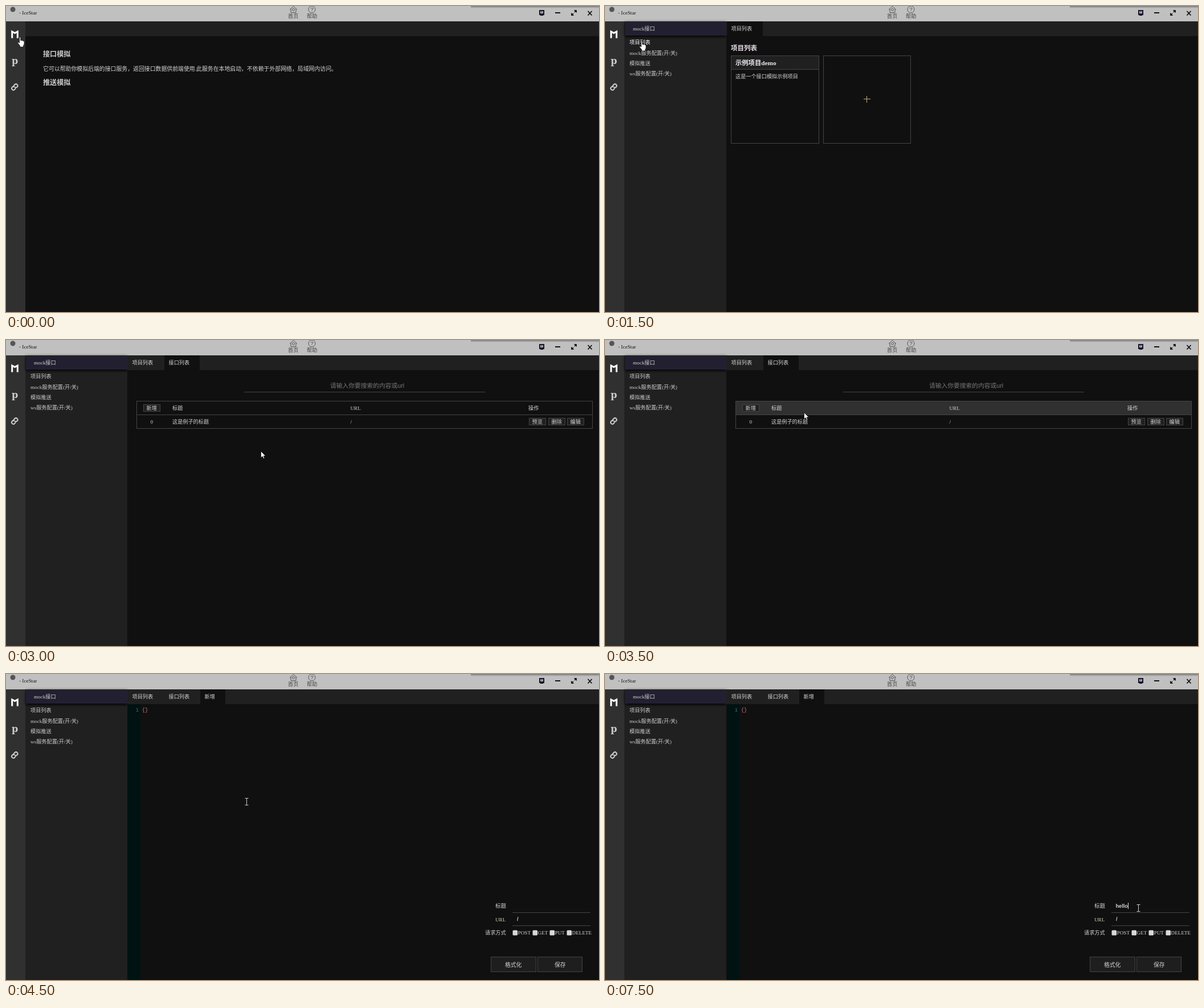
Animation, 1041 px wide and 538 px high, one loop 8 s. Source, as an HTML page with a canvas:

```html
<!DOCTYPE html>
<html lang="zh-CN">
<head>
<meta charset="utf-8">
<style>
html, body { margin: 0; width: 100%; height: 100%; overflow: hidden; background: #101010; }
canvas { display: block; }
</style>
</head>
<body>
<canvas width="1041" height="538"></canvas>
<script>
const ctx = document.querySelector('canvas').getContext('2d');
const LOOP = 8000, STEP = 500;
const SERIF = '"Liberation Serif", "Noto Sans CJK SC", "Noto Sans CJK", serif';
const SANS = '"Liberation Sans", "Noto Sans CJK SC", "Noto Sans CJK", sans-serif';
const MONO = '"Liberation Mono", monospace';
const LINE = '#444', TEXT = '#d4d4d4', SMALL = 9.17;

// Pointer shape and top left corner for each half second
const pointer = [
  ['hand', 20, 54], ['hand', 13, 48], ['hand', 102, 73], ['hand', 60, 61],
  ['hand', 290, 186], ['hand', 290, 128], ['arrow', 447, 195], ['arrow', 349, 127],
  ['hand', 257, 122], ['beam', 419, 218], ['beam', 556, 279], ['beam', 897, 407],
  ['beam', 908, 405], ['beam', 933, 405], ['beam', 933, 405], ['beam', 933, 405]
];

function rect(x, y, w, h, color) {
  ctx.fillStyle = color;
  ctx.fillRect(x, y, w, h);
}

function box(x, y, w, h, fill, border = LINE) {
  rect(x, y, w, h, border);
  rect(x + 1, y + 1, w - 2, h - 2, fill);
}

// Text placed by its left edge and vertical middle
function text(s, x, y, color = TEXT, size = SMALL, weight = '', family = SERIF) {
  ctx.font = `${weight} ${size}px ${family}`;
  ctx.fillStyle = color;
  ctx.fillText(s, x, y + size * 0.36);
}

function stroke(d, color, width = 1) {
  ctx.strokeStyle = color;
  ctx.lineWidth = width;
  ctx.stroke(new Path2D(d));
}

function shape(d, x, y, fill, border) {
  ctx.save();
  ctx.translate(x, y);
  const path = new Path2D(d);
  ctx.fillStyle = fill;
  ctx.fill(path);
  ctx.strokeStyle = border;
  ctx.lineWidth = 0.8;
  ctx.stroke(path);
  ctx.restore();
}

function titleBar() {
  rect(0, 0, 1041, 27, '#c0c0c0');
  const shade = ctx.createLinearGradient(0, 0, 0, 4);
  shade.addColorStop(0, '#777');
  shade.addColorStop(1, '#c0c0c0');
  rect(816, 0, 225, 4, shade);
  ctx.fillStyle = '#555';
  ctx.beginPath();
  ctx.arc(12, 6, 4.5, 0, 7);
  ctx.fill();
  text('- IceStar', 23, 11.5, '#111');

  stroke('M498 6.5L504.5 .5L511 6.5M500 5V11.5H509V5M506.5 6.5a2 2 0 1 1-4 0a2 2 0 1 1 4 0', '#555');
  stroke('M543 6a6 6 0 1 1-12 0a6 6 0 1 1 12 0', '#555');
  text('?', 534.6, 6, '#444', 9.5, '', SANS);
  text('首页', 495, 18, '#444');
  text('帮助', 528, 18, '#444');

  rect(936, 7, 9, 9, '#181028');
  rect(938, 9, 5, 4, '#c0c0c0');
  rect(939, 10, 3, 1, '#181028');
  rect(938, 16, 5, 1, '#181028');
  rect(964, 11, 9, 2, '#111');
  stroke('M993 16L996 13M998 11L1001 8', '#111', 1.5);
  shape('M0 0V-4L4 0ZM9 -9V-5L5 -9Z', 992.5, 16.5, '#111', '#111');
  stroke('M1021.5 9L1028.5 16.5M1028.5 9L1021.5 16.5', '#111', 1.8);
}

function sideBar() {
  rect(0, 27, 34, 511, '#303030');
  stroke('M10.7 56.5V45L15.5 47.5L20.3 45V56.5', '#fff', 3);
  text('p', 10, 96.5, '#ccc', 16, 'bold', '"DejaVu Serif", serif');
  stroke('M15 142.5a3 3 0 1 0 0 4.5L17 144.5M15.5 142.5a3 3 0 1 0 0 -4.5L13 141', '#ccc', 2);
}

function menu(hover) {
  rect(34, 27, 179, 511, '#202020');
  ctx.shadowColor = '#000';
  ctx.shadowBlur = 5;
  ctx.shadowOffsetY = 2;
  rect(35, 27, 178, 25, '#222030');
  ctx.shadowColor = 'transparent';
  text('mock接口', 49, 40);
  ['项目列表', 'mock服务配置(开/关)', '模拟推送', 'ws服务配置(开/关)'].forEach((s, i) =>
    text(s, 43, 64 + 18.3 * i, i === hover ? '#fff' : '#ccc'));
}

function tabs(left, active) {
  rect(left, 27, 1041 - left, 26, '#202020');
  [['项目列表', 214, 63], ['接口列表', 278, 62], ['新增', 341, 44]].slice(0, active).forEach(([s, x, w], i) => {
    if (i === active - 1) rect(x, 27, w, 26, '#101010');
    text(s, x + 7.5, 40);
  });
}

function home(x) {
  text('接口模拟', x, 85, '#ccc', 12.1, 'bold');
  text('它可以帮助你模拟后端的接口服务，返回接口数据供前端使用.此服务在本地启动，不依赖于外部网络，局域网内访问。',
    x, 110, TEXT, 9.9);
  text('推送模拟', x, 135, '#ccc', 12.1, 'bold');
}

function projects(hover) {
  text('项目列表', 221, 74, '#eadfea', 11.5, 'bold');
  box(221, 87, 155, 155, '#101010');
  rect(222, 88, 153, 23, '#202020');
  rect(222, 111, 153, 1, LINE);
  text('示例项目demo', 229, 99.5, '#f0eaf0', 11.3, 'bold');
  text('这是一个接口模拟示例项目', 229, 124);
  if (hover) {
    stroke('M363 94H355V105H366V99', '#ddd', 1.5);
    stroke('M359 101.5L366 94', '#ddd', 2.4);
  }
  box(383, 87, 154, 155, '#101010');
  rect(454, 163, 12, 1, '#c8aa88');
  rect(459, 158, 1, 12, '#c8aa88');
}

function button(s, x, y, color = TEXT) {
  box(x, y, 30, 13, '#202020');
  text(s, x + 5.5, y + 6.3, color, SMALL, '', SANS);
}

function table(rowHover, buttonHover) {
  text('请输入你要搜索的内容或url', 569, 80, '#757575', 10.75, '', SANS);
  rect(418, 91, 423, 1, LINE);
  box(229, 107, 801, 49, '#101010');
  if (rowHover) rect(230, 108, 799, 23, '#303030');
  rect(230, 131, 799, 1, LINE);
  button('新增', 241, 113, buttonHover ? '#fff' : TEXT);
  text('标题', 292, 120);
  text('URL', 604.5, 120);
  text('操作', 917, 120);
  text('0', 253.5, 143.5);
  text('这是例子的标题', 292, 143.5);
  text('/', 604.5, 143.5);
  ['预览', '删除', '编辑'].forEach((s, i) => button(s, 918 + Math.round(33.5 * i), 137));
}

function editor(typed, caret) {
  rect(214, 53, 22, 485, '#001212');
  text('1', 227.7, 63, '#3f7a70', 9, '', MONO);
  text('{}', 238.7, 63, '#c87878', 9, '', MONO);

  text('标题', 859, 408, TEXT, 9.5);
  text('URL', 859, 431.5, '#d8d4b0');
  text('请求方式', 841, 455);
  rect(889, 419, 137, 1, LINE);
  rect(889, 442, 137, 1, LINE);
  text('/', 897, 431, TEXT, SMALL, 'bold', SANS);
  text(typed, 896.5, 407.5, TEXT, SMALL, 'bold', SANS);
  if (caret) rect(Math.round(896.5 + ctx.measureText(typed).width), 402, 1, 11, '#ddd');

  [['POST', 889], ['GET', 924], ['PUT', 954], ['DELETE', 984]].forEach(([s, x]) => {
    ctx.fillStyle = '#d8d8d8';
    ctx.beginPath();
    ctx.roundRect(x + 0.5, 450.5, 8.5, 9, 1.5);
    ctx.fill();
    text(s, x + 9.6, 455);
  });
  box(851, 497, 80, 27, '#1e1e1e');
  text('格式化', 876, 511, TEXT, 9.8);
  box(933, 497, 79, 27, '#1e1e1e');
  text('保存', 963, 511, TEXT, 9.8);
}

function drawPointer([kind, x, y]) {
  if (kind === 'hand') {
    shape('M3.5 1.5Q4.5 0 5.7 1.5V6.5Q7 5.6 8 6.8Q9.4 6.2 10 7.5Q11.8 7 12 8.8V13L10.5 16V18H4.5V16L.8 11.2Q.3 9.2 2 9.4L3.5 11Z',
      x, y, '#fff', '#111');
  } else if (kind === 'arrow') {
    shape('M.5 .5V12L3.2 9.6L5 13.5L6.8 12.7L5.1 8.9H8.7Z', x, y, '#fff', '#111');
  } else {
    stroke(`M${x + 0.5} ${y + 0.5}H${x + 6.5}M${x + 3.5} ${y + 0.5}V${y + 12.5}M${x + 0.5} ${y + 12.5}H${x + 6.5}`, '#ccc');
  }
}

function draw(step) {
  rect(0, 0, 1041, 538, '#101010');
  titleBar();
  sideBar();
  if (step > 0) menu(step === 2 ? 1 : step === 3 ? 0 : -1);
  tabs(step > 0 ? 213 : 34, step < 3 ? 0 : step < 6 ? 1 : step < 9 ? 2 : 3);
  if (step < 3) home(step > 0 ? 244.5 : 65);
  else if (step < 6) projects(step > 3);
  else if (step < 9) table(step > 6, step > 7);
  else editor(step < 14 ? '' : step < 15 ? 'he' : 'hello', step === 12 || step > 13);
  drawPointer(pointer[step]);
}

function tick() {
  draw(Math.floor(performance.now() % LOOP / STEP));
  requestAnimationFrame(tick);
}
tick();
</script>
</body>
</html>
```
